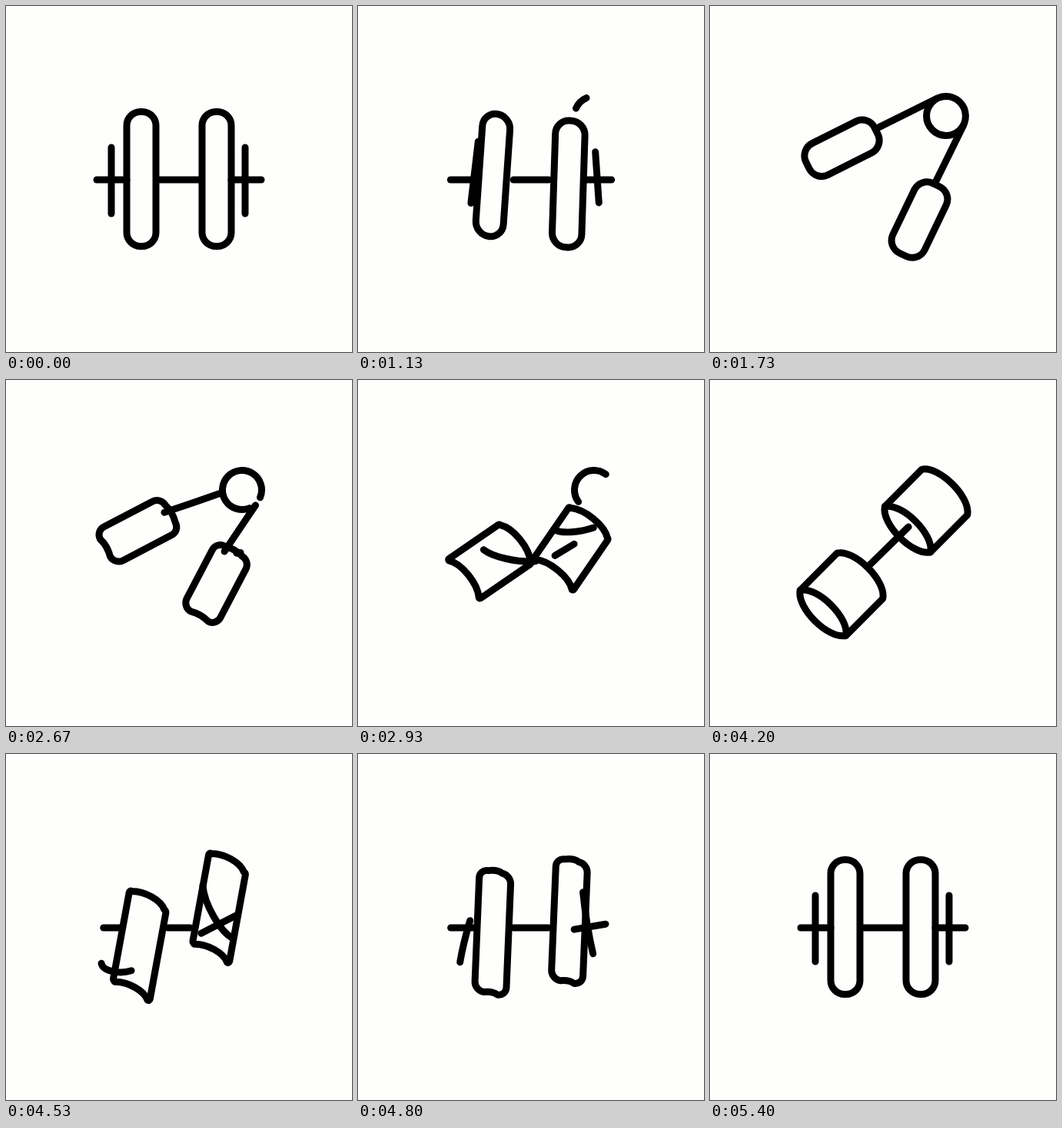
Animation of 450 by 450 pixels, one loop 5430 ms. Source, as an HTML page:

```html
<!DOCTYPE html>
<html lang="en">
<head>
<meta charset="utf-8">
<title>Fitness icons</title>
<style>
  html, body { margin: 0; width: 100%; height: 100%; overflow: hidden; background: #fefefd; }
  svg { display: block; width: 100vw; height: 100vh; }
  path { fill: none; stroke: #000; stroke-width: 9; stroke-linecap: round; stroke-linejoin: round; }
</style>
</head>
<body>
<svg viewBox="0 0 450 450"></svg>
<script>
const LOOP = 5430;
const BOW = [14, -14];
const RING = { x: 307, y: 143, r: 25.5 };
const ARM = 86;

const mix = (a, b, p) => a + (b - a) * p;
const mixAll = (a, b, p) => a.map((v, i) => mix(v, b[i], p));
const fmt = (...n) => n.map(v => v.toFixed(2)).join(" ");

// Point (x, y) turned by deg about (cx, cy).
function turn(cx, cy, deg, x, y) {
  const a = deg * Math.PI / 180, c = Math.cos(a), s = Math.sin(a);
  return [cx + x * c - y * s, cy + x * s + y * c];
}

// Corners clockwise from the top left.
const box = (x, y, w, h, deg) =>
  [[-1, -1], [1, -1], [1, 1], [-1, 1]].flatMap(([i, j]) => turn(x, y, deg, i * w / 2, j * h / 2));

// One half of the icon in its three poses: barbell, hand grip, dumbbell.
function half(side, handle, drum) {
  const deg = 45 - 19 * side;
  const spoke = y => turn(RING.x, RING.y, deg, side * RING.r, y);
  const bodies = [box(225 + 49 * side, 225, 38, 175, 0), box(...handle, 46, 100, deg), box(...drum, 84, 68, 45)];
  const x = 224 + 87 * side, [, , , , rx, ry, lx, ly] = bodies[2];
  const rims = [
    [x, 227 - 43 * side, x, 227 + 43 * side],
    [...spoke(ARM), ...spoke(0)],
    [lx, ly, rx, ry]
  ];
  return { bodies, rims };
}

const HALVES = [half(-1, [171.5, 184.5], [171, 279]), half(1, [272.5, 278.5], [281, 170])];
const level = (x1, x2, y = 226) => [x1, y, x2, y];
const BARS = [level(118, 157), level(199, 251)];
const STUB = level(293, 332);
const ROD = [STUB, STUB, [206, 242, 258, 191]];

const STEPS = [
  { from: 540, to: 1840, ease: [1, 0.4], lag: 0 },
  { from: 2075, to: 3375, ease: [1, 0.4], lag: 0 },
  { from: 4162, to: 5430, ease: [0.4, 0], lag: 0.2 }
];

// cubic-bezier(x1, 0, x2, 1)
function ease(x, x1, x2) {
  if (x <= 0) return 0;
  if (x >= 1) return 1;
  let lo = 0, hi = 1, s = 0.5;
  for (let i = 0; i < 24; i++) {
    s = (lo + hi) / 2;
    const q = 1 - s;
    if (3 * s * q * q * x1 + 3 * s * s * q * x2 + s ** 3 < x) lo = s; else hi = s;
  }
  return s * s * (3 - 2 * s);
}

// Cubic over the chord a-b; bend 0 is straight, 1 or -1 a full bow.
function curve(a, b, bend) {
  const k = mix(1 / 3, 0.15, Math.abs(bend));
  const at = t => mixAll(a, b, t).map((v, i) => v + BOW[i] * bend);
  return "C" + fmt(...at(k), ...at(1 - k), ...b);
}

function toward(a, b, d) {
  const len = Math.hypot(b[0] - a[0], b[1] - a[1]) || 1;
  return mixAll(a, b, Math.min(d / len, 0.5));
}

function body(v, bend) {
  const pts = [0, 2, 4, 6].map(i => v.slice(i, i + 2));
  const r = 18 * (1 - bend) ** 3;
  let d = "M" + fmt(...toward(pts[0], pts[1], r));
  pts.forEach((p, i) => {
    const next = pts[(i + 1) % 4], after = pts[(i + 2) % 4];
    const start = toward(p, next, r), end = toward(next, p, r), out = toward(next, after, r);
    d += i % 2 ? "L" + fmt(...end) : curve(start, end, bend);
    d += "C" + fmt(...mixAll(end, next, 0.55), ...mixAll(out, next, 0.55), ...out);
  });
  return d + "Z";
}

const rim = (v, bend) => "M" + fmt(v[0], v[1]) + curve(v.slice(0, 2), v.slice(2), -(bend ** 1.5));

// Line shortened evenly around its middle.
function trimmed(v, part) {
  if (part < 0.02) return "";
  const a = v.slice(0, 2), b = v.slice(2), cut = (1 - part) / 2;
  return "M" + fmt(...mixAll(a, b, cut)) + "L" + fmt(...mixAll(a, b, 1 - cut));
}

// Ring that opens both ways from its upper left.
function ring(part) {
  if (part < 0.02) return "";
  const at = share => fmt(...turn(RING.x, RING.y, 225 + 180 * share, RING.r, 0));
  const arc = share => `A${RING.r} ${RING.r} 0 0 1 ${at(share)}`;
  return "M" + at(-part) + arc(0) + arc(part);
}

const svg = document.querySelector("svg");
const paths = Array.from({ length: 8 }, () =>
  svg.appendChild(document.createElementNS("http://www.w3.org/2000/svg", "path")));

function draw(t) {
  const i = Math.max(0, STEPS.findLastIndex(s => t >= s.from)), j = (i + 1) % 3;
  const { from, to, ease: [x1, x2], lag } = STEPS[i];
  const x = (t - from) / (to - from);
  const p = ease(x, x1, x2), q = ease(x, x1, x2 + lag);
  const pose = (poses, k) => mixAll(poses[i], poses[j], k);
  const amount = (values, k) => mix(values[i], values[j], k);

  const shapes = [
    ...BARS.map(b => trimmed(b, amount([1, 0, 0], p))),
    trimmed(pose(ROD, p), amount([1, 0, 1], p)),
    ring(amount([0, 1, 0], p)),
    ...HALVES.flatMap(h => [
      body(pose(h.bodies, p), amount([0, 0, 1], p)),
      rim(pose(h.rims, q), amount([0, 0, 1], q))
    ])
  ];
  shapes.forEach((d, n) => paths[n].setAttribute("d", d));
}

const begin = performance.now();
function tick() {
  draw((performance.now() - begin) % LOOP);
  requestAnimationFrame(tick);
}
tick();
</script>
</body>
</html>
```
